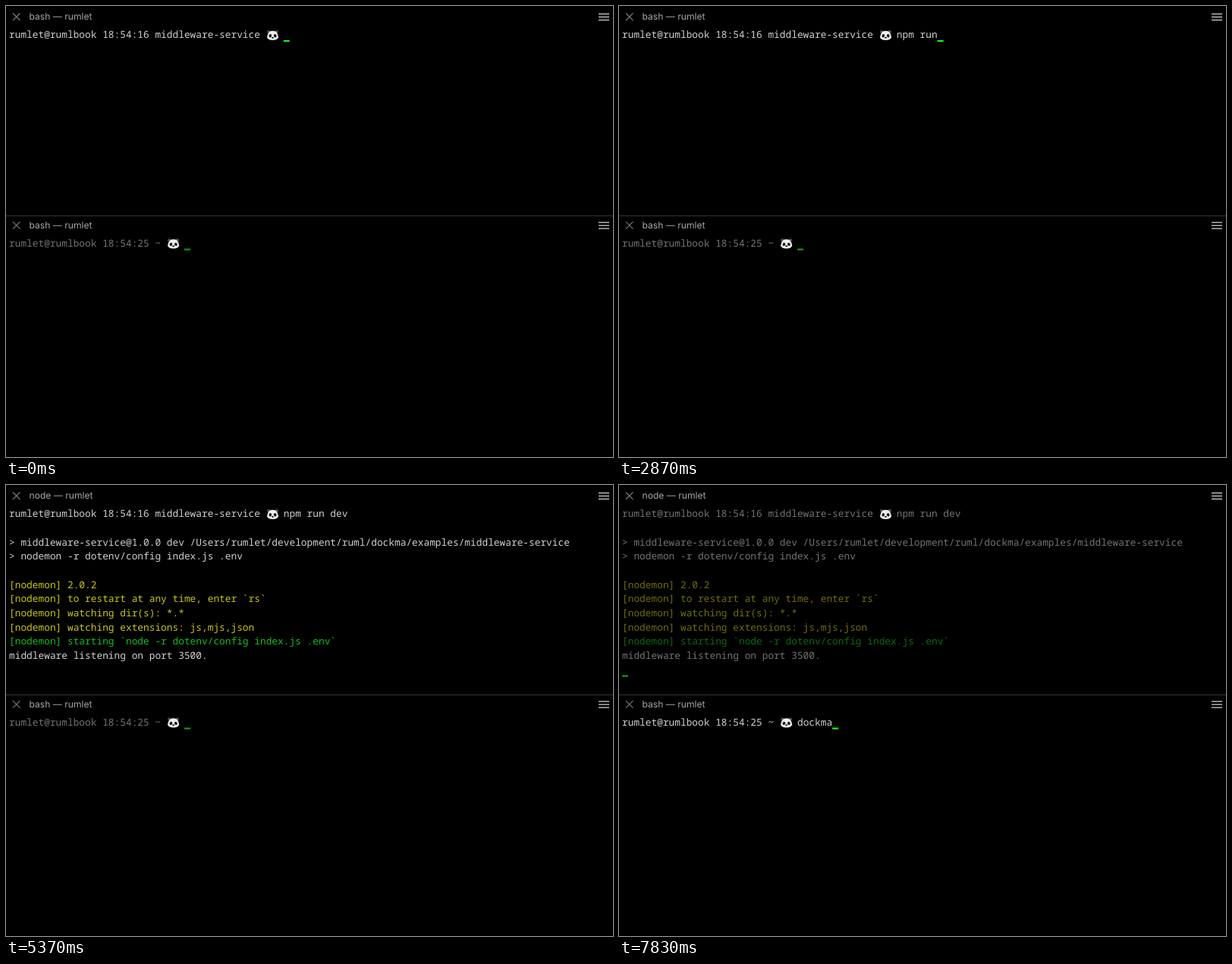
Write an HTML page that moves like this. It is 800x594 px and loops after 8000 ms.

```html
<!DOCTYPE html>
<html lang="en">
<head>
<meta charset="utf-8">
<title>Terminal</title>
<style>
  html, body { margin: 0; height: 100%; overflow: hidden; background: #000; }
  svg { display: block; }
  text { white-space: pre; text-rendering: geometricPrecision; }
  .title { font: 12.1px Inter, sans-serif; fill: #a6a6a6; }
  .line { font: 12.83px "Noto Sans Mono", monospace; fill: #d0d0d0; }
  .yellow { fill: #c9c60c; }
  .green { fill: #0fc01c; }
  .cursor { fill: #1ff20c; }
</style>
</head>
<body>
<svg id="stage" width="800" height="594" viewBox="0 0 800 594">
  <defs>
    <g id="panda">
      <circle cx="-5.3" cy="-4.3" r="2.3" fill="#484848"/>
      <circle cx="5.3" cy="-4.3" r="2.3" fill="#484848"/>
      <path d="M-4.6 -4.4Q0 -6.8 4.6 -4.4Q7 -1.5 7.6 2.6Q6.4 6.6 0 6.6Q-6.4 6.6 -7.6 2.6Q-7 -1.5 -4.6 -4.4Z" fill="#eee"/>
      <ellipse cx="-3.2" cy="1" rx="1.8" ry="2.2" fill="#181818" transform="rotate(25 -3.2 1)"/>
      <ellipse cx="3.2" cy="1" rx="1.8" ry="2.2" fill="#181818" transform="rotate(-25 3.2 1)"/>
      <ellipse cy="3.4" rx="1.6" ry="1" fill="#222"/>
    </g>
    <g id="chrome" fill="none">
      <path d="M9 9.5l9.5 9.5m0-9.5L9 19" stroke="#7c7c7c" stroke-width="1.1"/>
      <path d="M781 10.5h14m-14 4h14m-14 4h14" stroke="#999" stroke-width="1.8"/>
    </g>
  </defs>
  <path d="M0 276.3h800" stroke="#3a3a3a"/>
</svg>
<script>
const LOOP = 8000, CELL = 7.698, ROW = 18.68, LEFT = 4;
const FOCUS_SWITCH = 6600;
const stage = document.getElementById('stage');
const column = n => LEFT + n * CELL;

function add(parent, tag, attributes, content = '') {
  const node = document.createElementNS('http://www.w3.org/2000/svg', tag);
  for (const key in attributes) node.setAttribute(key, attributes[key]);
  node.textContent = content;
  return parent.appendChild(node);
}

function makePane(top, prompt) {
  const root = add(stage, 'g', { transform: `translate(0 ${top})` });
  const start = prompt.length + 4; // the panda takes two cells, with a space on each side
  add(root, 'use', { href: '#chrome' });
  const title = add(root, 'text', { class: 'title', x: 30.5, y: 18.4 });
  const body = add(root, 'g', {});
  const addLine = (text, row = 0, color = '', x = LEFT) =>
    add(body, 'text', { class: 'line ' + color, x, y: 42.2 + row * ROW }, text);
  addLine(prompt);
  const command = addLine('', 0, '', column(start));
  add(root, 'use', { href: '#panda', x: column(prompt.length + 2) + 1.1, y: 38.3 });
  const cursor = add(root, 'rect', { class: 'cursor', width: 8, height: 2.3 });

  return {
    addLine,
    update(name, typed, row, active, cursorAlpha) {
      title.textContent = name + ' — rumlet';
      command.textContent = typed;
      body.setAttribute('opacity', active ? 1 : 0.55);
      cursor.setAttribute('x', column(row ? 0 : start + typed.length));
      cursor.setAttribute('y', 44.9 + row * ROW);
      cursor.setAttribute('opacity', active ? cursorAlpha : 0.62);
    }
  };
}

const upper = makePane(0, 'rumlet@rumlbook 18:54:16 middleware-service');
const lower = makePane(274.6, 'rumlet@rumlbook 18:54:25 ~');

// [time, row, text, color]
const output = [
  [3930, 2, '> middleware-service@1.0.0 dev /Users/rumlet/development/ruml/dockma/examples/middleware-service'],
  [3930, 3, '> nodemon -r dotenv/config index.js .env'],
  [4000, 5, '[nodemon] 2.0.2', 'yellow'],
  [4000, 6, '[nodemon] to restart at any time, enter `rs`', 'yellow'],
  [4000, 7, '[nodemon] watching dir(s): *.*', 'yellow'],
  [4000, 8, '[nodemon] watching extensions: js,mjs,json', 'yellow'],
  [4030, 9, '[nodemon] starting `node -r dotenv/config index.js .env`', 'green'],
  [4300, 10, 'middleware listening on port 3500.']
].map(([time, row, text, color]) => ({ time, node: upper.addLine(text, row, color) }));

const upperKeys = [1730, 1930, 2100, 2300, 2470, 2570, 2800, 2900, 3000, 3200, 3400];
const lowerKeys = [7130, 7300, 7430, 7600, 7700, 7830];
const typed = (text, keys, t) => text.slice(0, keys.filter(k => k <= t).length);
const clamp = v => Math.max(0, Math.min(1, v));

function blink(t) {
  const phase = t % 1000;
  return clamp((60 - phase) / 60) + clamp((phase - 510) / 50);
}

function upperRow(t) {
  if (t < 3670) return 0;
  if (t < 3930) return 1;
  if (t < 4000) return 5;
  return t < 4030 ? 9 : t < 4300 ? 10 : 11;
}

function draw(now) {
  const t = now % LOOP;
  const upperActive = t < FOCUS_SWITCH;
  const upperSolid = t >= upperKeys[0] && t < 4120;
  const lowerSolid = t >= lowerKeys[0];
  for (const line of output) line.node.setAttribute('visibility', t >= line.time ? 'visible' : 'hidden');
  upper.update(t < 4170 ? 'bash' : 'node', typed('npm run dev', upperKeys, t),
    upperRow(t), upperActive, upperSolid ? 1 : blink(t));
  lower.update('bash', typed('dockma', lowerKeys, t),
    0, !upperActive, lowerSolid ? 1 : t < 7000 ? 0 : blink(t - 500));
}

const began = performance.now();
function tick() {
  draw(performance.now() - began);
  requestAnimationFrame(tick);
}
draw(0);
requestAnimationFrame(tick);
</script>
</body>
</html>
```
